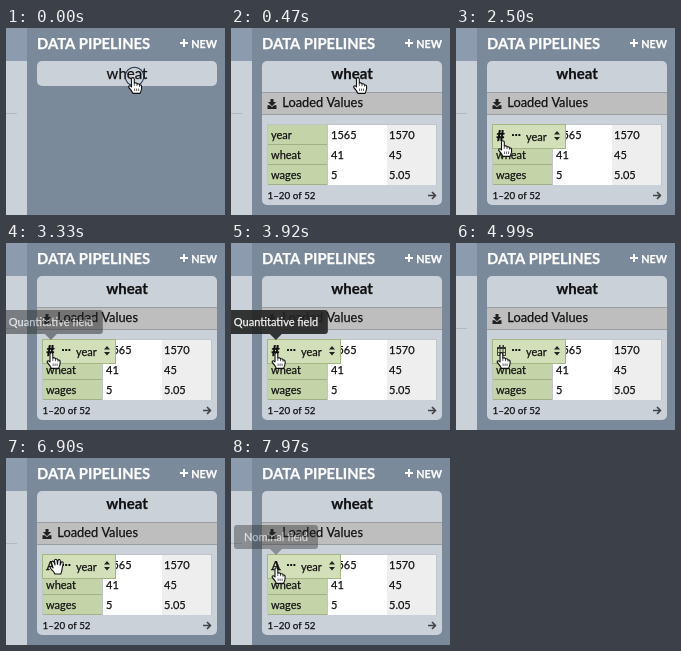
Animation of 219 by 187 pixels, one loop 8 s. Source, as an HTML page with a canvas:

```html
<!DOCTYPE html>
<html lang="en">
<head>
<meta charset="utf-8">
<style>
  html, body { margin: 0; width: 100%; height: 100%; overflow: hidden; background: #7b8a9a; }
  canvas { display: block; width: 219px; height: 187px; }
  #tip {
    position: absolute; left: 45px; top: 67px; padding: 0 10px; transform: translateX(-50%);
    font: 11px/24px Lato, sans-serif; white-space: nowrap;
    color: #fff; background: #222; border-radius: 3px;
    -webkit-text-stroke: .25px #fff;
  }
  #tip::after {
    content: ''; position: absolute; left: 50%; top: 100%; margin-left: -6px;
    border: 6px solid transparent; border-top-color: #222; border-bottom: 0;
  }
</style>
</head>
<body>
<canvas id="stage"></canvas>
<div id="tip"></div>
<script>
const W = 219, H = 187, LOOP = 8000;
const canvas = document.getElementById('stage');
const tip = document.getElementById('tip');
const ratio = window.devicePixelRatio || 1;
canvas.width = W * ratio;
canvas.height = H * ratio;
const ctx = canvas.getContext('2d');

const INK = '#111', CARD = '#cbd1d9', GREEN = '#c4d4a8';

// Each row: start time, then the state held until the next row.
const cursors = [
  [0, 'point', 122, 49],
  [1310, 'point', 141, 62], [1430, 'point', 136, 78], [1550, 'point', 112, 92],
  [1660, 'open', 84, 102], [1780, 'open', 74.5, 103],
  [2260, 'open', 66, 107], [2380, 'open', 52, 112], [2490, 'point', 42, 112], [2610, 'point', 40.5, 109],
  [4400, 'open', 43, 101], [4520, 'open', 43, 104], [4640, 'open', 42, 107],
  [4760, 'point', 41, 113], [4870, 'point', 41, 111], [4990, 'point', 40.5, 109],
  [6900, 'open', 43.5, 100.5], [7250, 'point', 41, 108.5], [7970, 'point', 40.5, 109]
];
const tooltips = [
  [0, '', 0],
  [3330, 'Quantitative field', .48], [3450, 'Quantitative field', .8], [3570, 'Quantitative field', .9],
  [4400, '', 0],
  [5700, 'Temporal field', .48], [5820, 'Temporal field', .9],
  [6900, '', 0],
  [7970, 'Nominal field', .38]
];
const icons = [[0, 'number'], [4400, 'calendar'], [6900, 'letter']];
const clicks = [[0, 128.5, 48.5], [110], [3800, 46.5, 107.5], [3920]];

const hands = {
  point: new Path2D('M3.5 10V2.2Q3.5.7 4.9.7T6.3 2.2V6Q9 5.5 9 7Q11.3 6.3 11.5 8Q13.6 7.6 13.6 9.6V11.5Q13.3 14 12 16.4H5Q3.6 13.5.8 10.5Q.3 8.8 1.7 8.8Q2.8 9 3.5 10Z'),
  open: new Path2D('M3.6 9.5L2.2 5Q1.6 3.2 2.8 2.7Q4 2.4 4.6 4L5.6 6.5L5 2.3Q5 .8 6.2 .8T7.6 2.3L8 6L8.5 2Q8.8 .9 9.9 1.1T10.9 2.7L10.6 6.7L11.6 4Q12.2 3 13.2 3.4Q14 4 13.6 5.4L12.6 10Q12.5 13 11.3 15.5H5.4Q4.5 13 1 9.8Q.2 8.4 1.4 8Q2.4 7.8 3.6 9.5Z')
};
const knuckles = new Path2D('M6.3 6V9M9 7V9.2M11.5 8V9.8M6.6 11.5V14M8.6 11.5V14M10.6 11.5V14');
const download = new Path2D('M39.5 71h3v3h2.6L41 78.2 36.9 74H39.5ZM36.5 77.3h2.4l2.1 2 2.1-2H45.5V81H36.5Z');

const stateAt = (rows, t) => rows.filter(row => row[0] <= t).pop();

function rect(x, y, w, h, fill, radius = 0) {
  ctx.fillStyle = fill;
  ctx.beginPath();
  ctx.roundRect(x, y, w, h, radius);
  ctx.fill();
}

// A hairline outline gives the type its slightly heavy look.
function text(str, x, y, size, fill = INK, weight = 400, align = 'left', family = 'Lato, sans-serif') {
  ctx.font = `${weight} ${size}px ${family}`;
  ctx.textAlign = align;
  ctx.fillStyle = ctx.strokeStyle = fill;
  ctx.lineWidth = .25;
  ctx.fillText(str, x, y);
  ctx.strokeText(str, x, y);
}

function stroke(path, color, width) {
  ctx.strokeStyle = color;
  ctx.lineWidth = width;
  ctx.stroke(path);
}

function drawPage() {
  rect(0, 0, W, H, '#7b8a9a');
  rect(0, 0, 21, 33, '#8c9bae');
  rect(0, 33, 21, H - 33, CARD);
  rect(0, 85, 11, 1, '#b3b9c1');
  text('DATA PIPELINES', 31, 21, 14.8, '#fff', 700);
  rect(174, 14, 8, 2, '#fff');
  rect(177, 11, 2, 8, '#fff');
  text('NEW', 185.3, 20, 10.8, '#fff', 700);
}

function drawTable() {
  rect(36, 96, 170, 61, '#c0c5ca');
  const rows = [['year', '1565', '1570'], ['wheat', '41', '45'], ['wages', '5', '5.05']];
  rows.forEach(([name, first, second], i) => {
    const y = 97 + i * 20, base = y + 14;
    rect(37, y, 59, 19, GREEN);
    rect(97, y, 59, 20, '#fff');
    rect(156, y, 49, 20, '#eee');
    rect(37, y + 19, 59, 1, '#a3b087');
    text(name, 40, base, 11);
    text(first, 100, base, 11);
    text(second, 158, base, 11);
  });
  text('1–20 of 52', 36.5, 171, 9.8);
  stroke(new Path2D('M197 167.5H204M201 164L204.5 167.5L201 171'), '#444', 1.7);
}

function drawCard(t) {
  const open = t >= 350;
  const height = t >= 470 ? 144 : open ? 54 : 25;
  rect(31, 33, 180, height, CARD, 5);
  text('wheat', 121, 51, 15, INK, open ? 700 : 400, 'center');
  if (!open) return;
  rect(31, 64, 180, 23, '#9b9d9f');
  rect(31, 65, 180, 21, '#bebebe');
  ctx.fillStyle = '#222';
  ctx.fill(download);
  text('Loaded Values', 51.3, 79, 12.8);
  if (t >= 470) drawTable();
}

function drawIcon(kind) {
  if (kind === 'number') text('#', 40.5, 112.5, 14, INK, 900);
  if (kind === 'letter') text('A', 40, 112, 13, INK, 700, 'left', '"Noto Serif", serif');
  if (kind === 'calendar') {
    stroke(new Path2D('M41.5 104.5H49.5V112.5H41.5ZM44 106V112M47 106V112M42 109.5H49'), '#333', .9);
    rect(41, 104, 9, 2, '#333');
    rect(43, 102, 1.5, 3, '#333');
    rect(46.5, 102, 1.5, 3, '#333');
  }
}

function drawField(t) {
  if (t < 1660) return;
  rect(36, 96, 74, 25, '#a5b584');
  rect(37, 97, 72, 23, '#d3dfb9');
  drawIcon(stateAt(icons, t)[1]);
  for (const x of [56, 59.2, 62.4]) rect(x, 106, 2, 2, INK, .5);
  text('year', 70, 113, 11);
  ctx.fillStyle = '#222';
  ctx.fill(new Path2D('M98 106.5L101 103L104 106.5ZM98 109L101 112.5L104 109Z'));
}

function updateTooltip(t) {
  const [, label, alpha] = stateAt(tooltips, t);
  tip.textContent = label;
  tip.style.opacity = alpha;
}

function drawCursor(t) {
  const [, x, y] = stateAt(clicks, t);
  if (x) {
    const ring = new Path2D();
    ring.arc(x, y, 9.3, 0, 7);
    stroke(ring, '#20344f', 1.1);
  }
  const [, shape, left, top] = stateAt(cursors, t);
  ctx.save();
  ctx.translate(left, top);
  ctx.fillStyle = '#fff';
  ctx.fill(hands[shape]);
  stroke(hands[shape], '#111', 1.1);
  if (shape === 'point') stroke(knuckles, '#222', .7);
  ctx.restore();
}

function draw(t) {
  ctx.setTransform(ratio, 0, 0, ratio, 0, 0);
  ctx.lineJoin = 'round';
  drawPage();
  drawCard(t);
  drawField(t);
  updateTooltip(t);
  drawCursor(t);
}

const start = performance.now();
function tick() {
  draw((performance.now() - start) % LOOP);
  requestAnimationFrame(tick);
}
tick();
</script>
</body>
</html>
```
